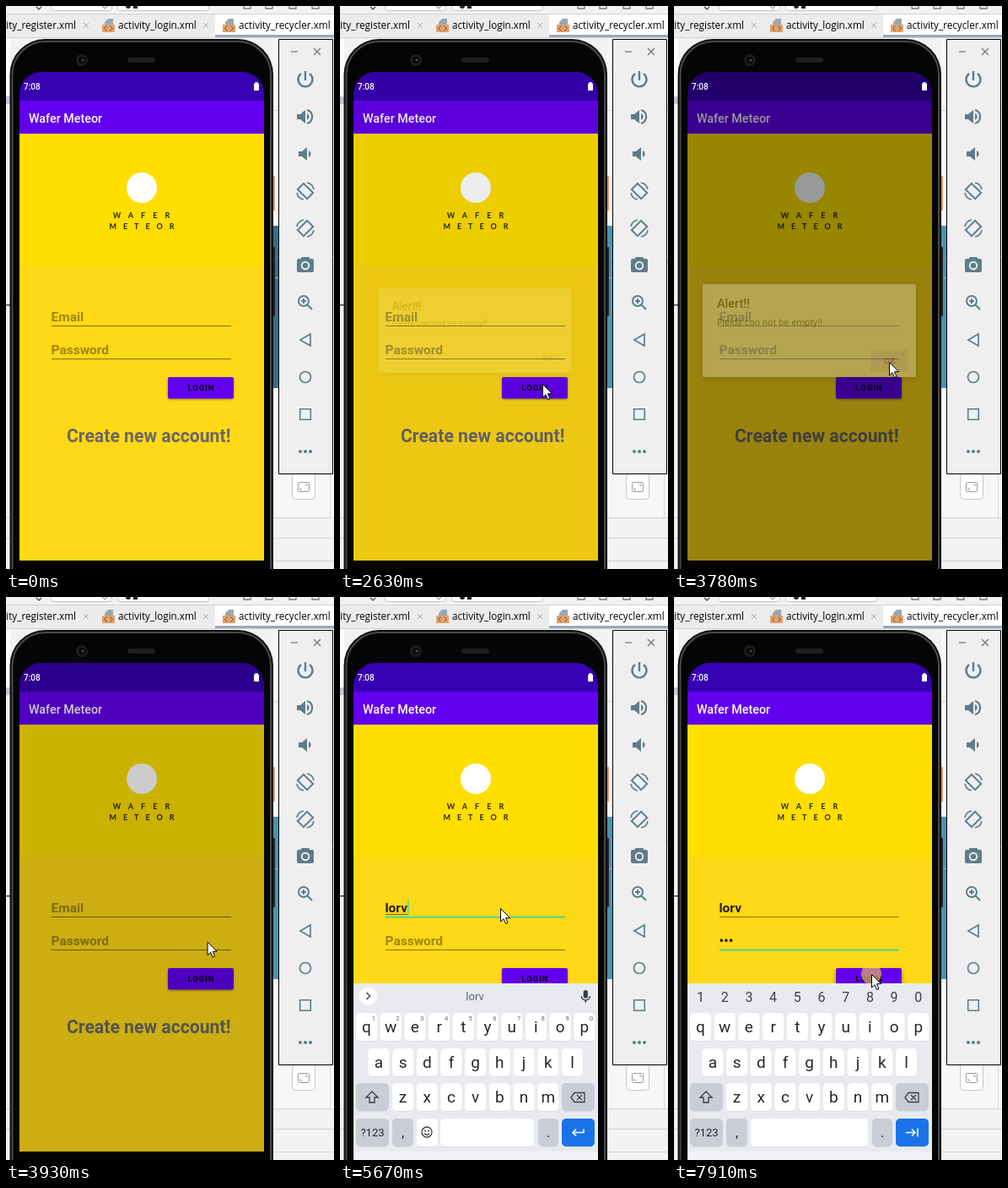
Animation of 389 by 666 pixels, one loop 8000 ms. Source, as an HTML page with a canvas:

```html
<!DOCTYPE html>
<html lang="en">
<head>
<meta charset="utf-8">
<title>Login form demo</title>
<style>
html, body { margin: 0; width: 100%; height: 100%; overflow: hidden; }
canvas { display: block; }
</style>
</head>
<body>
<canvas width="389" height="666"></canvas>
<script>
const stage = document.querySelector('canvas').getContext('2d');
const layer = stage.canvas.cloneNode().getContext('2d');
let ctx = stage;
const LOOP = 8000, INK = '#5f7c8a', TEAL = '#03dac5';
const BRAND = 'Wafer Meteor', USER = 'lorv', SECRET = 'wer';
const CLICKS = [[2160, 2380], [3460, 3630], [4410, 4620], [7910, 8000]];
const POINTER = [ // time, x, y
  [380, 380, 640], [610, 240, 427], [990, 240, 427], [1200, 258, 372], [1420, 325, 400],
  [1760, 240, 433], [1840, 240, 433], [1910, 240, 447], [2630, 240, 447], [3000, 210, 412],
  [3310, 255, 421], [3780, 255, 421], [4240, 190, 368], [7070, 190, 368], [7680, 234, 446]
];

const clamp = v => Math.max(0, Math.min(1, v));
const ramp = (t, from, to) => clamp((t - from) / (to - from));
const smooth = p => p * p * (3 - 2 * p);
const blink = (t, start) => t >= start && Math.floor((t - start) / 480) % 2 === 0;
const typedCount = (t, times) => times.filter(at => t >= at).length;
const userTyped = t => typedCount(t, [5350, 5425, 5500, 5670]);
const roboto = (size, weight = 400) => `${weight} ${size}px Roboto, sans-serif`;

function rect(x, y, w, h, color) {
  ctx.fillStyle = color;
  ctx.fillRect(x, y, w, h);
}
function round(x, y, w, h, r, fill, stroke, line = 1) {
  ctx.beginPath();
  ctx.roundRect(x, y, w, h, r);
  if (fill) { ctx.fillStyle = fill; ctx.fill(); }
  if (stroke) { ctx.strokeStyle = stroke; ctx.lineWidth = line; ctx.stroke(); }
}
function disc(x, y, r, color) {
  ctx.beginPath();
  ctx.arc(x, y, r, 0, 7);
  ctx.fillStyle = color;
  ctx.fill();
}
function text(str, x, y, font, color, align = 'left', spacing = 0) {
  ctx.font = font;
  ctx.fillStyle = color;
  ctx.textAlign = align;
  ctx.letterSpacing = spacing + 'px';
  ctx.fillText(str, x, y);
  ctx.letterSpacing = '0px';
}
// Paths are centred on 0,0; a line width of 0 fills the path.
function icon(x, y, path, color = INK, line = 2, angle = 0) {
  ctx.save();
  ctx.translate(x, y);
  ctx.rotate(angle);
  const shape = new Path2D(path);
  ctx.lineWidth = line;
  ctx.fillStyle = ctx.strokeStyle = color;
  if (line) ctx.stroke(shape); else ctx.fill(shape);
  ctx.restore();
}
function shadow(blur, y, alpha) {
  ctx.shadowColor = `rgba(0,0,0,${alpha})`;
  ctx.shadowBlur = blur;
  ctx.shadowOffsetY = y;
}
const noShadow = () => shadow(0, 0, 0);

function drawTabs() {
  rect(0, 0, 389, 666, '#f2f2f2');
  round(53.5, -10, 72, 15.5, 3, '#fff', '#c4c4c4');
  round(132.5, -10, 108, 15.5, 3, '#fff', '#c4c4c4');
  icon(39, 1, 'M-3 0L0 3 3 0', '#555', 1.5);
  icon(117, 0, 'M-3 0L0 3 3 0', '#777', 1);
  disc(145, 0, 3, '#222');
  rect(151, 0, 5, 3, '#222');
  for (const x of [286, 312, 340, 367]) icon(x, 0, 'M-4 0V3H4V0', '#777', 1.3);
  rect(0, 9, 389, 1, '#d1d1d1');
  rect(0, 10, 389, 27, '#ececec');
  rect(248, 10, 141, 27, '#fff');
  rect(248, 34, 141, 3, '#9ca7b8');
  rect(0, 37, 389, 1, '#d1d1d1');
  const font = '11.7px "Open Sans", "Noto Sans", sans-serif';
  text('activity_register.xml', 83, 27, font, '#000', 'right');
  text('activity_login.xml', 133, 27, font, '#000');
  text('activity_recycler.xml', 276, 27, font, '#000');
  for (const x of [95, 237]) icon(x, 23, 'M-3-3L3 3M3-3L-3 3', '#aaa', 1);
  for (const x of [114, 257]) {
    icon(x, 15, 'M3 4L7 0H13V7H3Z', '#9aa7b0', 0);
    rect(x, 22, 15, 9, '#e2a16c');
    icon(x + 7.5, 26.5, 'M-2-3L-5 0-2 3M2-3L5 0 2 3', '#6b4a2c', 1);
  }
}

function drawEditor(t) {
  rect(0, 38, 5, 69, '#fff');
  rect(0, 107, 6, 9, '#c3c9d2');
  rect(0, 353, 6, 1.5, '#444');
  rect(0, 605, 6, 1, '#cfcfcf');
  rect(0, 629, 6, 1, '#cfcfcf');
  rect(317, 38, 72, 567, '#f7f7f7');
  rect(317, 123, 72, 1, '#d1d1d1');
  rect(314, 201, 5, 41, '#e39a6a');
  rect(314, 260, 9, 192, t < 1000 ? '#2f7089' : '#4b93ac');
  rect(314, 321, 9, 1, '#8fc1d2');
  rect(384, 553, 1, 52, '#d5d5d5');
  for (const y of [605, 629, 656]) rect(317, y, 72, 1, '#d1d1d1');
  round(339.5, 545.5, 27, 38, 4, '#fff', '#c6c6c6');
  round(346.5, 563.5, 13, 11, 1, null, '#9a9a9a');
  icon(353, 569, 'M-4 1V3H-2M2-3H4V-1', '#9a9a9a', 1);
}

function drawSidebar() {
  round(323.5, 39.5, 64, 514, 0, '#efefef', '#000');
  icon(342, 54, 'M-4 0H4', '#777', 1.3);
  icon(369, 54, 'M-4-4L4 4M4-4L-4 4', '#777', 1.3);
  const x = 355;
  icon(x, 87, 'M0-10V1M-5-7A8.5 8.5 0 1 0 5-7', INK, 2.4);
  const speaker = 'M-10-3V3H-6L0 8V-8L-6-3Z';
  icon(x, 131, speaker, INK, 0);
  icon(x, 131, 'M2-8A8.3 8.3 0 0 1 2 8', INK, 2.2);
  icon(x, 131, 'M2-4A4.3 4.3 0 0 1 2 4Z', INK, 0);
  icon(x + 2, 175, speaker, INK, 0);
  icon(x + 2, 175, 'M2-4A4.3 4.3 0 0 1 2 4Z', INK, 0);
  for (const [y, side] of [[219, -1], [263, 1]]) {
    icon(x, y, 'M-5-8H5V8H-5Z', INK, 2, side * Math.PI / 4);
    icon(x, y, side < 0 ? 'M-10 2A10 10 0 0 0-2 10M2-10A10 10 0 0 1 10-2'
                        : 'M10 2A10 10 0 0 1 2 10M-2-10A10 10 0 0 0-10-2', INK, 1.6);
  }
  round(345, 299, 20, 16, 2, INK);
  round(350, 297, 10, 4, 1, INK);
  disc(x, 307, 5.2, '#efefef');
  disc(x, 307, 3.3, INK);
  icon(x - 2, 349, 'M6 0A6 6 0 1 1-6 0A6 6 0 1 1 6 0M4 4L10 10M-3 0H3M0-3V3', INK, 2);
  icon(x, 395, 'M-6 0L6-7V7Z', INK, 1.7);
  icon(x, 439, 'M6.5 0A6.5 6.5 0 1 1-6.5 0A6.5 6.5 0 1 1 6.5 0', INK, 1.7);
  icon(x, 483, 'M-6.3-6.3H6.3V6.3H-6.3Z', INK, 1.6);
  for (const dx of [-6, 0, 6]) disc(x + dx, 527, 2, INK);
}

function drawPhone() {
  round(314, 285, 5, 82, 1, '#222');
  round(4.5, 39, 312.5, 700, [42, 42, 0, 0], '#0d0d0d');
  round(7.5, 42, 306.5, 700, [39, 39, 0, 0], '#050505', '#484848', 2);
  disc(90, 64, 7, '#1d1d1f');
  disc(90, 64, 4, '#0a0a0c');
  disc(91, 64, 1.5, '#4a4d55');
  round(144, 61, 33, 6, 3, '#1e1e1e');
}

function drawField(hint, value, y, focused, caretOn, composing) {
  const font = roboto(15.5, 700);
  text(value || hint, 53.5, y, font, value ? '#221d08' : 'rgba(0,0,0,.38)');
  const width = value ? ctx.measureText(value).width : 0;
  if (composing) rect(54, y + 2, width, 1, 'rgba(34,29,8,.6)');
  rect(54, y + 5, 213, focused ? 1.3 : 1, focused ? TEAL : 'rgba(0,0,0,.48)');
  if (caretOn) rect(54 + width, y - 15, 1, 18, TEAL);
}

function drawLogin(t) {
  const pressed = (t >= 2160 && t < 2500) || t >= 7910;
  shadow(pressed ? 6 : 3, pressed ? 3 : 1, .35);
  round(192, 439, 78, 25.5, 2, '#6200ee');
  noShadow();
  if (t >= 2160 && t < 2500) {
    ctx.save();
    ctx.clip();
    disc(240, 449, 10 + 60 * ramp(t, 2160, 2380), `rgba(255,255,255,${.2 * (1 - ramp(t, 2250, 2500))})`);
    ctx.restore();
  }
  text('LOGIN', 231.5, 455, roboto(9.5, 700), '#0b0414', 'center', .9);
}

function drawApp(t) {
  rect(16, 78, 290, 34, '#3700b3');
  rect(16, 112, 290, 39, '#6200ee');
  text(BRAND, 27, 137.5, roboto(14.3, 500), '#fff');
  rect(16, 151, 290, 156, '#ffde00');
  rect(16, 307, 290, 349, '#ffd817');
  disc(161, 215, 18, '#fff');
  BRAND.toUpperCase().split(' ').forEach((word, i) =>
    text(word, 165, 251 + 13 * i, '700 9px Lato, sans-serif', '#2a2408', 'center', 9 - i));

  const onEmail = t >= 4410 && t < 5820, typed = userTyped(t);
  drawField('Email', USER.slice(0, typed), 373, onEmail,
    onEmail && (typed || blink(t, 4700)), onEmail && typed);

  const count = typedCount(t, [6200, 6280, 6440]);
  const last = t < 7910 ? SECRET.charAt(count - 1) : '•';
  const secret = count ? '•'.repeat(count - 1) + last : '';
  drawField('Password', secret, 412, t >= 5820, t >= 5820 && (t < 6420 || blink(t, 6420)));

  drawLogin(t);
  text('Create new account!', 72, 516, roboto(21.2, 700), '#6c6768');
}

function drawCard(dismissed) {
  shadow(8, 3, .4);
  round(34, 329, 253, 110, 2, '#fff');
  noShadow();
  if (dismissed) round(233, 407, 45, 26, 2, 'rgba(98,0,238,.14)');
  text('Alert!!', 51, 357, roboto(14.4, 500), '#222');
  text('Fields can not be empty!!', 51, 378, roboto(11.3), '#444');
  text('OK', 249, 423, roboto(9.5, 500), '#6436b8', 'left', .9);
}

function drawDialog(t) {
  if (t < 2630 || t > 4100) return;
  const enter = ramp(t, 2600, 2850);
  rect(16, 78, 290, 578, `rgba(0,0,0,${.6 * enter * (1 - ramp(t, 3630, 4080))})`);

  // The card fades as one group, so it is painted on its own layer first.
  ctx = layer;
  ctx.clearRect(0, 0, 389, 666);
  drawCard(t >= 3630);
  ctx = stage;

  const scale = .9 + .1 * smooth(enter);
  ctx.save();
  ctx.globalAlpha = enter * (1 - ramp(t, 3630, 3838));
  ctx.translate(160.5 * (1 - scale), 384 * (1 - scale));
  ctx.scale(scale, scale);
  ctx.drawImage(layer.canvas, 0, 0);
  ctx.restore();
}

function key(x, y, w, label, fill = '#fff', size = 19) {
  rect(x + 3, y + 32, w - 6, 1.5, '#cfd2d8');
  round(x, y, w, 33, 5, fill);
  if (label) text(label, x + w / 2, y + 16 + size * .35, roboto(size), '#25272b', 'center');
}

function drawKeyboard(t) {
  if (t < 4870) return;
  const secure = t >= 5820, GRAY = '#c9cdd6', DARK = '#3c4043', PITCH = 28.7;
  ctx.save();
  ctx.translate(0, 209 * (1 - ramp(t, 4830, 5180)) ** 2);
  rect(16, 457, 290, 209, '#e8eaef');
  rect(16, 656, 290, 10, '#f1f2f5');
  const col = i => 19 + i * PITCH;

  [...'qwertyuiop'].forEach((letter, i) => {
    const digit = String((i + 1) % 10);
    key(col(i), 492, 25, letter);
    if (secure) text(digit, col(i) + 12.5, 479, roboto(16), DARK, 'center');
    else text(digit, col(i) + 23, 500.5, roboto(7.5), '#5f6368', 'right');
  });
  [...'asdfghjkl'].forEach((letter, i) => key(col(i + .5), 534, 25, letter));
  [...'zxcvbnm'].forEach((letter, i) => key(col(i + 1.5), 575, 25, letter));

  if (!secure) {
    disc(33.5, 472, 10.5, '#fff');
    icon(33.5, 472, 'M-2-4L2 0-2 4', DARK, 1.4);
    text(USER.slice(0, userTyped(t)), 160, 477, roboto(13), '#5f6368', 'center');
    round(288.7, 465, 5.2, 9.5, 2.6, DARK);
    icon(291.3, 472, 'M-5 0A5 5 0 0 0 5 0M0 5V8', DARK, 1.4);
  }

  key(19, 575, 39, '', GRAY);
  icon(38, 592, 'M0-7L7 0H3V6H-3V0H-7Z', DARK, 1.4);
  key(263, 575, 39, '', GRAY);
  icon(282, 592, 'M-8 0L-4-5.5H8V5.5H-4ZM-1-3L5 3M5-3L-1 3', DARK, 1.3);

  key(19, 617, 39, '?123', GRAY, 13);
  key(62, 617, 25, ',', GRAY, 16);
  if (secure) key(91, 617, 139, '');
  else {
    key(91, 617, 25, '');
    icon(103, 633, 'M6 0A6 6 0 1 1-6 0A6 6 0 1 1 6 0M-3 1.5Q0 5 3 1.5', DARK, 1.3);
    disc(101, 631.5, 1, DARK);
    disc(105, 631.5, 1, DARK);
    key(119, 617, 111, '');
  }
  key(235, 617, 24, '.', GRAY, 16);
  key(263, 617, 39, '', '#1a73e8');
  icon(282, 633.5, secure ? 'M-7 0H4M0-4L4 0 0 4M7-5V5' : 'M7-4V0H-6M-2-4L-6 0-2 4', '#fff', 1.6);
  ctx.restore();
}

function drawStatus() {
  text('7:08', 21, 99, roboto(10, 500), '#fff');
  round(294, 91.5, 6, 8.5, 1, '#fff');
  rect(295.5, 90, 3, 2, '#fff');
}

function drawPointer(t) {
  if (t < 380) return;
  let [, x, y] = POINTER.at(-1);
  const next = POINTER.findIndex(p => p[0] > t);
  if (next > 0) {
    const [t0, x0, y0] = POINTER[next - 1], [t1, x1, y1] = POINTER[next];
    const p = smooth(ramp(t, t0, t1));
    x = x0 + (x1 - x0) * p;
    y = y0 + (y1 - y0) * p;
  }
  if (CLICKS.some(([from, to]) => t >= from && t < to)) disc(x, y, 12, 'rgba(250,210,70,.6)');
  const arrow = 'M.5.5V16L4 12.7 6.5 18.5 9 17.4 6.5 11.7H11.5Z';
  icon(x, y, arrow, '#fff', 0);
  icon(x, y, arrow, '#000', 1);
}

function draw(t) {
  drawTabs();
  drawEditor(t);
  drawPhone();
  ctx.save();
  ctx.beginPath();
  ctx.roundRect(16, 78, 290, 588, [26, 26, 0, 0]);
  ctx.clip();
  drawApp(t);
  drawDialog(t);
  drawStatus();
  drawKeyboard(t);
  ctx.restore();
  drawSidebar();
  drawPointer(t);
}

const start = performance.now();
(function frame() {
  draw((performance.now() - start) % LOOP);
  requestAnimationFrame(frame);
})();
</script>
</body>
</html>
```
